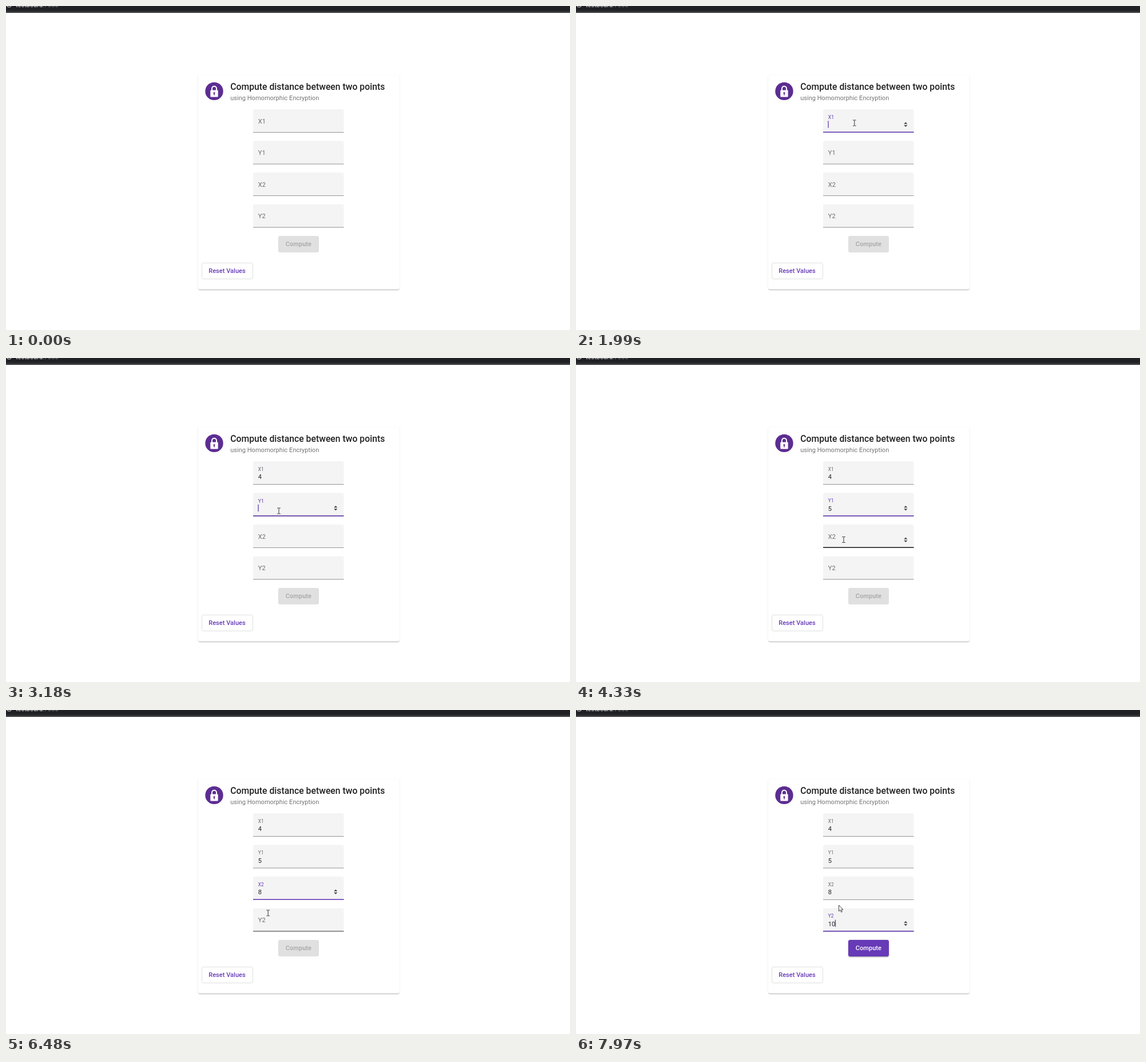
Animation, 986 px wide and 568 px high, one loop 7990 ms. Source, as an HTML page:

```html
<!DOCTYPE html>
<html lang="en">
<head>
<meta charset="utf-8">
<title>Distance form</title>
<style>
  html, body { margin: 0; width: 100%; height: 100%; overflow: hidden; background: #fff; }
  svg { display: block; position: absolute; left: 0; top: 0; }
  text { font: 400 11.06px Roboto, sans-serif; white-space: pre; }
  .card, .button { position: absolute; box-sizing: border-box; border-radius: 3.2px; }
  .card {
    left: 336px; top: 122px; width: 351.5px; height: 375px;
    box-shadow: 0 1.6px .8px -.8px rgba(0,0,0,.2), 0 .8px .8px rgba(0,0,0,.14), 0 .8px 2.4px rgba(0,0,0,.12);
  }
  .reset { left: 342px; top: 450px; width: 89.7px; height: 28.5px; border: 1px solid #e0e0e0; }
  .compute { left: 476px; top: 403px; width: 70.8px; height: 28.5px; }
  .medium { font-weight: 500; }
  .title { font-size: 15.75px; font-weight: 500; fill: rgba(0,0,0,.87); }
  .subtitle { fill: rgba(0,0,0,.54); }
  .value { fill: rgba(0,0,0,.87); }
</style>
</head>
<body>
<div class="card"></div>
<div class="button reset"></div>
<div class="button compute" id="compute"></div>
<svg width="986" height="568" viewBox="0 0 986 568">
  <rect width="986" height="12" fill="#35363a"/>
  <rect width="986" height="8.5" fill="#202124"/>
  <circle cx="5.5" cy="-2" r="4" fill="none" stroke="#d5d6d8" stroke-width="1.2"/>
  <text x="17" y="1.6" fill="#e8eaed">testboard<tspan fill="#85888c">:7300</tspan></text>

  <circle cx="364" cy="149.4" r="15.7" fill="#5c2d91"/>
  <path d="M360 149v-4.2a4 4 0 0 1 8 0v4.2" fill="none" stroke="#fff" stroke-width="2"/>
  <rect x="357.3" y="147.6" width="13.4" height="11.8" rx="1" fill="#fff"/>
  <path d="M364 152.5v4" stroke="#5c2d91" stroke-width="1.5"/>
  <circle cx="364" cy="152.4" r="1.5" fill="#5c2d91"/>

  <text class="title" x="392.2" y="147">Compute distance between two points</text>
  <text class="subtitle" x="392.2" y="164.5">using Homomorphic Encryption</text>
  <g id="fields"></g>
  <text class="medium" id="computeText" x="488.8" y="421">Compute</text>
  <text class="medium" x="354.3" y="467.7" fill="#673ab7">Reset Values</text>

  <path id="arrow" d="M0 0v10.6l2.5-2.3 1.7 3.9 1.7-.7-1.7-3.8h3.3z"
        fill="#fff" stroke="#222" stroke-width=".85" stroke-linejoin="round"/>
  <path id="beam" d="M-2.8-5h2.1l.7.6.7-.6h2.1M0-4.4v8.8M-2.8 5h2.1l.7-.6.7.6h2.1"
        fill="none" stroke="#333" stroke-width="1"/>
</svg>
<script>
const LOOP = 7990;
const LEFT = 432, WIDTH = 158.5, HEIGHT = 41, TOP = 181, PITCH = 55.5, TEXT_X = 440.8;
const PURPLE = [103, 58, 183];

// Focus and blur times, then the value after each key press
const fields = [
  { name: 'X1', on: 1830, off: 3040, keys: [[2100, '4']] },
  { name: 'Y1', on: 3040, off: 4435, keys: [[3340, '5']] },
  { name: 'X2', on: 4435, off: 6580, keys: [[5905, '8']] },
  { name: 'Y2', on: 6580, off: LOOP, keys: [[7310, '1'], [7500, '10']] }
];
const ENABLED = 7310;

// Pointer path: time, x, y
const path = [
  [460, 978, 560], [620, 800, 432], [780, 632, 326], [940, 532, 266], [1110, 496, 220],
  [1250, 487, 207], [1370, 486.8, 205], [2250, 486.8, 205], [2640, 480, 247],
  [2900, 477, 268], [3350, 477, 268], [3600, 471, 300], [3850, 469, 312],
  [4070, 468, 318.5], [6210, 468, 318.5], [6540, 456, 364], [6950, 456, 364],
  [7100, 448, 332], [7180, 446.6, 329.3], [7930, 446.6, 329.3],
  [7950, 453, 336], [7970, 459.5, 342.2]
];

const $ = id => document.getElementById(id);
const clamp = v => Math.max(0, Math.min(1, v));
const mix = (a, b, k) => a + (b - a) * k;
const rgba = (from, to, k) => `rgba(${from.map((v, i) => mix(v, to[i], k)).join()})`;

// cubic-bezier(.25, .8, .25, 1)
function ease(x) {
  x = clamp(x);
  let lo = 0, hi = 1, s = .5;
  for (let i = 0; i < 20; i++) {
    s = (lo + hi) / 2;
    const r = 1 - s;
    if (.75 * r * s + s ** 3 < x) lo = s; else hi = s;
  }
  const r = 1 - s;
  return 2.4 * r * r * s + 3 * r * s * s + s ** 3;
}

function add(tag, attrs, parent) {
  const el = document.createElementNS('http://www.w3.org/2000/svg', tag);
  set(el, attrs);
  return parent.appendChild(el);
}
function set(el, attrs) {
  for (const key in attrs) el.setAttribute(key, attrs[key]);
}

fields.forEach((f, i) => {
  f.top = TOP + PITCH * i;
  const g = add('g', { transform: `translate(0 ${f.top})` }, $('fields'));
  add('path', { d: `M${LEFT} ${HEIGHT}v-38q0-3 3-3h${WIDTH - 6}q3 0 3 3v38z`, fill: '#f4f4f4' }, g);
  add('rect', { x: LEFT, y: HEIGHT - 1, width: WIDTH, height: 1, fill: '#949494' }, g);
  f.line = add('rect', { y: HEIGHT - 1.6, height: 1.6 }, g);
  f.label = add('text', {}, g);
  f.label.textContent = f.name;
  f.value = add('text', { class: 'value', x: TEXT_X, y: 31 }, g);
  f.caret = add('rect', { y: 20.3, width: 1.3, height: 12.4, fill: '#673ab7' }, g);
  f.spin = add('path', { d: 'M573.2 25.7l3.1-3.2 3.1 3.2zm0 2l3.1 3.2 3.1-3.2z', fill: '#454545' }, g);
});

function pointer(t) {
  if (t < path[0][0]) return null;
  const i = path.findIndex(p => p[0] > t);
  if (i < 0) return path.at(-1).slice(1);
  const a = path[i - 1], b = path[i], k = (t - a[0]) / (b[0] - a[0]);
  return [mix(a[1], b[1], k), mix(a[2], b[2], k)];
}

function isOver(f, p, top = 0, bottom = HEIGHT) {
  return p && p[0] >= LEFT && p[0] <= LEFT + WIDTH && p[1] >= f.top + top && p[1] <= f.top + bottom;
}

// How long the pointer has stayed on a field, up to 600 ms
function hoverTime(f, t) {
  let d = 0;
  while (d < 600 && isOver(f, pointer(t - d))) d += 10;
  return d;
}

function drawField(f, t, p) {
  const focused = t >= f.on && t < f.off;
  const hover = hoverTime(f, t);
  const key = f.keys.filter(k => k[0] <= t).pop();
  const text = key ? key[1] : '';

  const float = ease((t - f.on) / 400);
  set(f.label, {
    transform: `translate(${TEXT_X} ${mix(25, 16.5, float)}) scale(${mix(1, .75, float)})`,
    fill: rgba([0, 0, 0, .56], [...PURPLE, 1], float - ease((t - f.off) / 400))
  });
  f.value.textContent = text;

  const since = t - Math.max(f.on, key ? key[0] : 0);
  set(f.caret, {
    x: TEXT_X - .4 + text.length * 6.21,
    visibility: focused && since % 1000 < 500 ? 'visible' : 'hidden'
  });

  const settled = hover >= 200 && isOver(f, p, 18, 35);
  f.spin.setAttribute('visibility', focused || settled ? 'visible' : 'hidden');

  set(f.line, {
    x: LEFT, width: WIDTH,
    fill: rgba([33, 33, 33], PURPLE, focused ? ease((t - f.on) / 300) : 0),
    opacity: focused ? 1 : ease(hover / 600)
  });
}

function drawPointer(p) {
  const beam = p && fields.some(f => isOver(f, p, 5, 36));
  $('beam').setAttribute('visibility', beam ? 'visible' : 'hidden');
  $('arrow').setAttribute('visibility', p && !beam ? 'visible' : 'hidden');
  if (p) set(beam ? $('beam') : $('arrow'), { transform: `translate(${p[0]} ${p[1]})` });
}

function drawCompute(t) {
  const k = ease((t - ENABLED) / 400);
  const lift = ease((t - ENABLED) / 280);
  $('compute').style.background = rgba([224, 224, 224], PURPLE, k);
  $('compute').style.boxShadow =
    `0 2.4px .8px -1.6px rgba(0,0,0,${.2 * lift}), 0 1.6px 1.6px rgba(0,0,0,${.14 * lift}), 0 .8px 4px rgba(0,0,0,${.12 * lift})`;
  $('computeText').setAttribute('fill', t < ENABLED ? '#a6a6a6' : '#fff');
}

const start = performance.now();
function draw() {
  const t = (performance.now() - start) % LOOP;
  const p = pointer(t);
  fields.forEach(f => drawField(f, t, p));
  drawPointer(p);
  drawCompute(t);
  requestAnimationFrame(draw);
}
draw();
</script>
</body>
</html>
```
